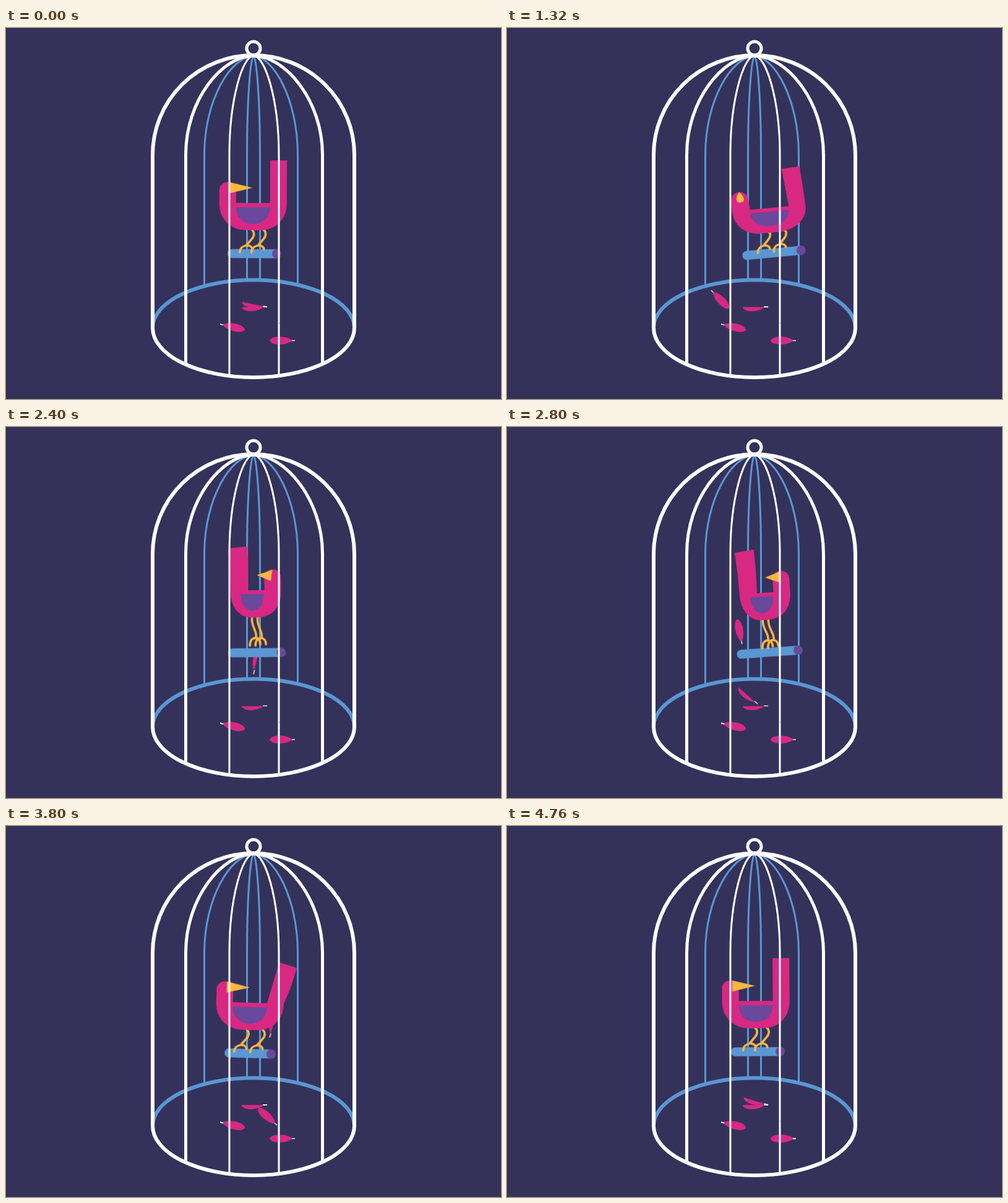
An HTML page without scripts that plays this animation: 800 px wide and 600 px high, repeating every 4.8 s.

```html
<!DOCTYPE html>
<html lang="en">
<head>
<meta charset="utf-8">
<title>Caged bird</title>
<style>
html, body { margin: 0; height: 100%; overflow: hidden; background: #34325b; }
svg { display: block; width: 100vw; height: 100vh; }
.line { fill: none; }
.pink { fill: #d82882; }
.blue { stroke: #5a97d3; stroke-width: 3; }
.white { stroke: #fff; filter: url(#rough); }

.swing, .dip, .hop, .lift, .pose, .tail, .beak, .perch, .leg, .fall {
  animation: 4800ms ease-in-out infinite;
}
.swing { transform-origin: 403px 63px; animation-name: swing; }
.dip { animation-name: dip; }
.hop { animation-name: hop; }
.lift { animation-name: lift; }
.perch { animation-name: perch; stroke: #5a97d3; stroke-width: 14.5; stroke-linecap: round; }
.tail { animation-name: tail; }
.beak { animation-name: beak; fill: #fdb73e; }
.pose { animation-name: pose; }
.leg { animation-name: spread; }
.leg path { fill: none; stroke: #fdb73e; stroke-width: 3.5; stroke-linecap: round; }
.fall { animation-timing-function: linear; }

/* Shapes of each part when facing left, squatting and facing right */
.body {
  --left: path("M346 263C346 245 373 245 373 263L373 283L428 283L455 283C455 310 437 327 412 327L390 327C364 327 346 309 346 284Z");
  --squat: path("M342 272C342 252 370 252 370 272L371 287L434 287L461 289C461 312 440 327 412 327L386 327C359 327 342 309 342 286Z");
  --right: path("M443 263C443 245 416 245 416 263L416 283L389 283L361 283C361 310 375 327 395 327L402 327C430 327 443 309 443 284Z");
}
.wing {
  fill: #6a489b;
  --left: path("M373 290H428C428 326 373 326 373 290Z");
  --squat: path("M371 293H433C433 324 371 324 371 293Z");
  --right: path("M415 289H378C378 325 415 325 415 289Z");
}
.leg path {
  --left: path("M397.5 325C404 330 403 336 399 341L390.5 351M379.5 363C380 349 399.5 349 399.5 358");
  --squat: path("M397.5 329C404 331 403 337 399 342L390.5 351M379.5 363C380 349 399.5 349 399.5 358");
  --right: path("M392.5 311C390 322 397 331 398.5 339L399 346M388.5 358C388 342 405.5 342 405.5 356");
}

@keyframes pose {
  0%, 21.9%, 33.3%, 47.1%, 72.9%, 100% { d: var(--left); }
  25.8%, 28.3% { d: var(--squat); }
  49.8%, 70% { d: var(--right); }
}
@keyframes tail {
  0%, 18%, 33.3%, 47.1%, 72.5%, 94%, 100% { d: path("M428 284Q428 250 428 214L455 214Q455 250 455 286Z"); }
  9%, 12.5% { d: path("M427 285Q432 250 439 211L463.5 216Q458 250 453 286Z"); }
  25.4%, 28% { d: path("M434 288Q431 256 428 226L457 224.5Q460 256 461 291Z"); }
  49.8%, 70% { d: path("M389 284Q391 250 389 212L358 215Q361 250 361 286Z"); }
  76%, 85.4% { d: path("M428 284Q437 250 446 216.5L474.5 224.5Q467 256 454 286Z"); }
}
@keyframes beak {
  0%, 6.5%, 30.2%, 47.1%, 79%, 100% { d: path("M362.5 249.5C375 252.5 387 255.5 399.5 258.5C387 261.5 375 264.5 362.5 267.5Z"); }
  11.5%, 25%, 72.5%, 76.3% { d: path("M357.5 248C348 251.5 338 255 328 258.5C338 262 348 265 358.5 268Z"); }
  27.1%, 27.9% { d: path("M356.6 257C362 262 367 274 356.8 274C347 274 351 262 356.6 257Z"); }
  49.6%, 59% { d: path("M429 250C421 253 412 256 404 258.5C411 261.5 419 265 426.5 268Z"); }
  61.7%, 70% { d: path("M427 249.5C440 252.5 452 255.5 463 258.5C452 261.5 440 264.5 427 267.5Z"); }
}
@keyframes swing {
  0%, 100% { transform: rotate(.3deg); animation-timing-function: cubic-bezier(.39, .575, .565, 1); }
  8.33% { transform: rotate(5.3deg); }
  25% { transform: rotate(-5.8deg); }
  41.67% { transform: rotate(3.2deg); }
  58.33% { transform: rotate(-4.1deg); }
  75% { transform: rotate(2.7deg); }
  91.67% { transform: rotate(-5.5deg); animation-timing-function: cubic-bezier(.47, 0, .745, .715); }
}
@keyframes perch {
  0%, 100% { d: path("M367 365H439"); }
  7% { d: path("M372 365H434"); }
  11.7% { d: path("M370.5 365H435.5"); }
  24%, 27.5% { d: path("M359 365H447"); }
  40.5% { d: path("M374 365H432"); }
  57.5% { d: path("M357 365H449"); }
  75% { d: path("M372 365H434"); }
  79.2% { d: path("M369 365H437"); }
  91% { d: path("M358 365H448"); }
}
@keyframes spread {
  0%, 100% { transform: none; }
  11.7% { transform: translateX(calc(var(--k) * -4px)); }
  27.5%, 79.2% { transform: translateX(calc(var(--k) * 7px)); }
  40% { transform: translateX(calc(var(--k) * -5px)); }
  50%, 70% { transform: translateX(calc(var(--k) * -10px)); }
}
@keyframes dip {
  0%, 71.5%, 85%, 100% { transform: none; }
  75.5% { transform: translateY(5px); }
  79.2% { transform: translateY(3px); }
}
@keyframes hop {
  0%, 46.7%, 50.8%, 69.6%, 74.2%, 100% { transform: none; }
  48.8% { transform: translateY(-14px); }
  71.9% { transform: translateY(-24px); }
}
@keyframes lift {
  0%, 5%, 33.3%, 43.5%, 78%, 100% { transform: none; }
  11%, 21% { transform: translate(2px, -1.5px); }
  25.8%, 28.5%, 45.8% { transform: translateY(5px); }
  48.5%, 60% { transform: translateY(-14.5px); }
  69.2% { transform: translateY(-2px); }
  71.5% { transform: translateY(-13px); }
  75% { transform: translateY(4px); }
}

/* Feathers: each is placed by the tip of its quill */
@keyframes fall-left {
  0%, 1.2% { opacity: 0; transform: translate(434px, 300px) rotate(-88deg); }
  1.3% { opacity: 1; }
  6.5% { transform: translate(412px, 338px) rotate(-50deg); }
  11.67% { transform: translate(382px, 357px) rotate(39deg); }
  18.5% { transform: translate(367px, 388px) rotate(18deg); }
  27.5% { transform: translate(330px, 424px) rotate(46deg); }
  31% { transform: translate(314px, 430px) rotate(30deg); }
  35.5% { transform: translate(323px, 448px) rotate(-8deg); }
  40% { transform: translate(346px, 479px) rotate(-2deg); }
  42.5%, 100% { opacity: 1; transform: translate(346px, 479px) rotate(13deg); }
}
@keyframes fall-back {
  0%, 36% { opacity: 0; transform: translate(436px, 302px) rotate(-85deg); }
  36.1% { opacity: 1; }
  40% { transform: translate(426px, 342px) rotate(-72deg); }
  46% { transform: translate(416px, 377px) rotate(-55deg); }
  52% { transform: translate(392px, 411px) rotate(-85deg); }
  58.33% { transform: translate(405px, 448px) rotate(-138deg); }
  60% { transform: translate(422px, 451px) rotate(-162deg); }
  62.5%, 100% { opacity: 1; transform: translate(422px, 451px) rotate(-180deg); }
}
@keyframes fall-right {
  0%, 54.5% { opacity: 0; transform: translate(389px, 295px) rotate(-100deg); }
  54.6% { opacity: 1; }
  58.33% { transform: translate(380px, 351px) rotate(-101deg); }
  64.5% { transform: translate(332px, 385px) rotate(-55deg); }
  72% { transform: translate(376px, 440px) rotate(-95deg); }
  79.17% { transform: translate(438px, 484px) rotate(-138deg); }
  83.5% { transform: translate(500px, 500px) rotate(-170deg); }
  87% { transform: translate(500px, 496px) rotate(-192deg); }
  91% { transform: translate(467px, 505px) rotate(-195deg); }
  93%, 100% { opacity: 1; transform: translate(467px, 505.5px) rotate(-180deg); }
}
</style>
</head>
<body>
<svg viewBox="0 0 800 600">
  <defs>
    <filter id="rough" filterUnits="userSpaceOnUse" x="220" y="10" width="360" height="570" color-interpolation-filters="sRGB">
      <feTurbulence type="fractalNoise" baseFrequency=".2" numOctaves="1" seed="4"/>
      <feDisplacementMap in="SourceGraphic" scale="1.6" xChannelSelector="R" yChannelSelector="G"/>
    </filter>
    <marker id="end" markerUnits="userSpaceOnUse" markerWidth="16" markerHeight="16" refX="8" refY="8">
      <circle cx="8" cy="8" r="7.4" fill="#6a489b"/>
    </marker>
    <path id="quill" d="M0 0H7" stroke="#fff" stroke-width="1.3"/>
    <g id="leaf">
      <use href="#quill"/>
      <path class="pink" d="M5 0C10 -7.5 38 -9 41 0C38 9 10 7.5 5 0Z"/>
    </g>
    <g id="half">
      <use href="#quill"/>
      <path class="pink" d="M6 -.6H41C39 -9 16 -9 6 -.6Z"/>
    </g>
  </defs>

  <rect width="800" height="600" fill="#34325b"/>

  <g class="line blue">
    <path d="M320.5 416V205C320.5 117 363 46 400 46C433 46 471.5 117 471.5 205V414"/>
    <path d="M389.5 407V205C389.5 117 395 46 400 46C405 46 410.5 117 410.5 205V407"/>
    <path d="M237 485A163 77.5 0 0 1 563 485" style="stroke-width:6"/>
  </g>

  <use href="#half" transform="translate(422 451) rotate(180)"/>
  <use href="#leaf" transform="translate(346 479) rotate(13)"/>
  <use href="#leaf" transform="translate(467 505.5) rotate(180)"/>

  <g class="fall" style="animation-name:fall-left"><use href="#leaf"/></g>
  <g class="fall" style="animation-name:fall-back"><use href="#half"/></g>
  <g class="fall" style="animation-name:fall-right"><use href="#leaf"/></g>
  <g class="fall" style="animation-name:fall-back;animation-delay:-2920ms"><use href="#half"/></g>

  <g class="dip">
    <g class="swing">
      <path class="perch line" d="M367 365H439" marker-end="url(#end)"/>
      <g class="hop">
        <g class="leg" style="--k:-.33"><path class="pose"/></g>
        <g transform="translate(19)"><g class="leg" style="--k:.67"><path class="pose"/></g></g>
        <g class="lift">
          <path class="tail pink"/>
          <path class="body pose pink"/>
          <path class="wing pose"/>
          <path class="beak"/>
        </g>
      </g>
    </g>
  </g>

  <g class="line white">
    <circle cx="400" cy="33" r="11" stroke-width="5"/>
    <path d="M237 485V205A163 161 0 0 1 563 205V485A163 80 0 0 1 237 485Z" stroke-width="6"/>
    <path d="M290.5 544V205C290.5 117 349 45 400 45C451 45 511.5 117 511.5 205V544" stroke-width="5"/>
    <path d="M361 561V205C361 117 382 45 400 45C419 45 441 117 441 205V561" stroke-width="3"/>
  </g>
</svg>
</body>
</html>
```
